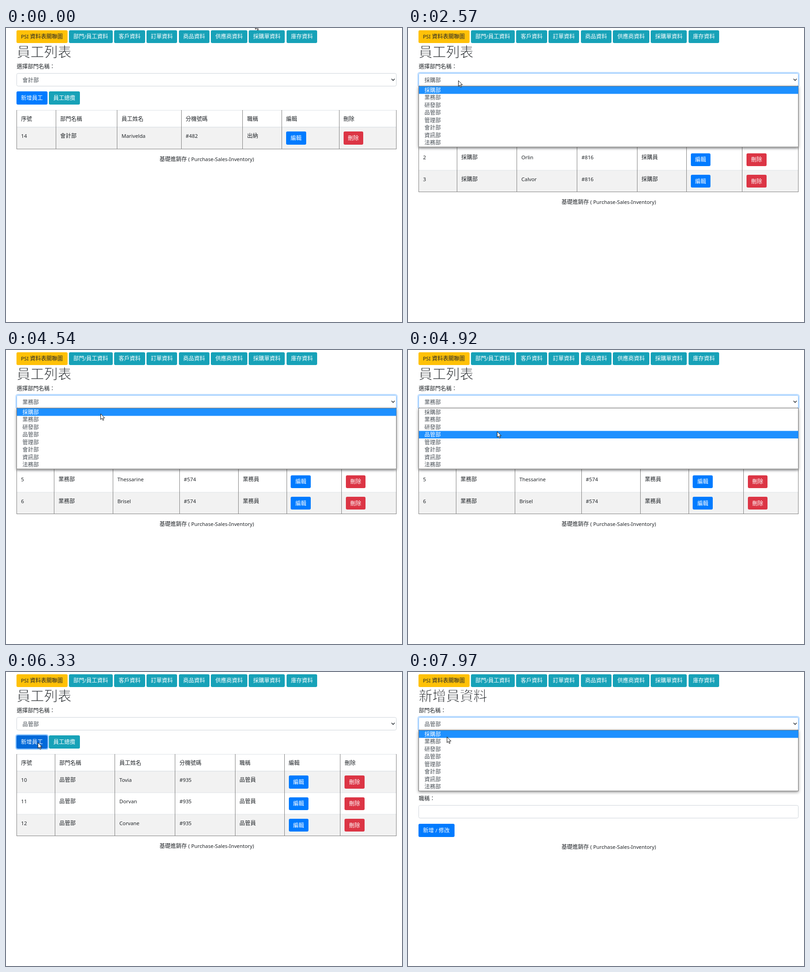
Write an HTML page that moves like this. It is 868x645 px and loops after 8000 ms.

```html
<!DOCTYPE html>
<html lang="zh-TW">
<head>
<meta charset="utf-8">
<style>
html, body { margin: 0; width: 100%; height: 100%; overflow: hidden; background: #fff; }
svg { display: block; width: 868px; height: 645px; font: 12px "Noto Sans", "Noto Sans CJK TC", "Noto Sans CJK", sans-serif; }
text { white-space: pre; }
.latin { font-size: .94em; }
.title { stroke: #fff; stroke-width: .9; }
.popup { filter: drop-shadow(0 2px 3px rgba(0, 0, 0, .45)); }
</style>
</head>
<body>
<svg viewBox="0 0 868 645">
  <g id="page"></g>
  <g id="pointer">
    <circle id="halo" r="9" fill="#ff0" fill-opacity=".5"/>
    <path d="M.5.5V13l2.9-2.7 2 4.6 2-.9-2-4.4h3.9z" fill="#fff" stroke="#111"/>
  </g>
</svg>
<script>
const LOOP = 8000, CLICK = 80;
const INK = '#212529', GRAY = '#495057', TEAL = '#17a2b8', BLUE = '#007bff', RED = '#dc3545';
const LEFT = 23.5, RIGHT = 855.5, PAD = 9.5, ROW = 47.3, ITEM = 16.5, MENU_TOP = 128;
const DEPTS = ['採購部', '業務部', '研發部', '品管部', '管理部', '會計部', '資訊部', '法務部'];
const NAV = ['PSI 資料表關聯圖', '部門/員工資料', '客戶資料', '訂單資料', '商品資料', '供應商資料', '採購單資料', '庫存資料'];
const HEADS = ['序號', '部門名稱', '員工姓名', '分機號碼', '職稱', '編輯', '刪除'];

// Each visit: when the page loads, when its menu is opened and when an entry is picked.
const VISITS = [
  { load: 0, open: 1090, pick: 1790, choice: 0, dept: 5,
    id: 14, ext: '#482', names: ['Marivelda'], jobs: ['出納'] },
  { load: 2095, open: 2490, pick: 3430, choice: 1, dept: 0,
    id: 1, ext: '#816', names: ['Palder', 'Orlin', 'Calvor'], jobs: ['採購員', '採購員', '採購部'] },
  { load: 3800, open: 4310, pick: 5150, choice: 3, dept: 1,
    id: 4, ext: '#574', names: ['Wenlor', 'Thessarine', 'Brisel'], jobs: ['業務員', '業務員', '業務員'] },
  { load: 5600, press: 6180, dept: 3,
    id: 10, ext: '#935', names: ['Tovia', 'Dorvan', 'Corvane'], jobs: ['品管員', '品管員', '品管員'] },
  { load: 6500, open: 7590, dept: 3, form: true }
];
// Pointer stops: arrival time, x, y.
const STOPS = [
  [0, 546, -10], [920, 78, 117], [1470, 70, 135], [2250, 110, 115], [3280, 143, 160.5],
  [4310, 206, 118], [4540, 207, 139.5], [4920, 195, 178.5], [5080, 194, 184],
  [6110, 69.5, 154.5], [6960, 75, 124], [7420, 79, 122], [7960, 85, 142]
];

function charWidth(ch) {
  if (ch > '~') return 12;
  return ch === ' ' ? 3.3 : /[a-z]/i.test(ch) ? 5.65 : 4.6;
}
const textWidth = str => [...str].reduce((sum, ch) => sum + charWidth(ch), 0);
const buttonWidth = label => textWidth(label) + 2 * PAD + .5;

function text(str, x, y, { color = INK, size = 12, weight = 400, anchor = 'start', cls = '' } = {}) {
  const runs = str.replace(/[!-~]+/g, run => `<tspan class="latin">${run}</tspan>`);
  return `<text class="${cls}" x="${x}" y="${y + size * .38}" fill="${color}" font-size="${size}" font-weight="${weight}" text-anchor="${anchor}">${runs}</text>`;
}
function rect(x, y, w, h, fill, extra = '') {
  return `<rect x="${x}" y="${y}" width="${w}" height="${h}" fill="${fill}" ${extra}/>`;
}
function line(x1, y1, x2, y2, color, width = 1) {
  return `<path d="M${x1} ${y1}L${x2} ${y2}" stroke="${color}" stroke-width="${width}"/>`;
}
function button(label, x, y, fill, color = '#fff') {
  const left = Math.round(x), top = Math.round(y);
  const w = Math.round(x + buttonWidth(label)) - left, h = Math.round(y + 28.5) - top;
  return rect(left, top, w, h, fill, 'rx="3"') + text(label, x + PAD + .25, y + 14.3, { color });
}
function ring(x, y, w, h, color) {
  return rect(x - 1.2, y - 1.2, w + 2.4, h + 2.4, 'none', `rx="4" stroke="${color}" stroke-width="2.4"`);
}
function field(y, stroke = '#ced4da') {
  return rect(LEFT, Math.round(y) + .5, RIGHT - LEFT, 28, '#fff', `rx="3" stroke="${stroke}"`);
}
function footer(y) {
  return text('基礎進銷存 ( Purchase-Sales-Inventory)', 440, y, { anchor: 'middle' });
}

function navBar() {
  let x = 22.9;
  return NAV.map((label, i) => {
    const item = button(label, x, 4.6, i ? TEAL : '#ffc107', i ? '#fff' : INK);
    x += buttonWidth(label) + 3.2;
    return item;
  }).join('');
}
function select(value, focused) {
  return (focused ? ring(23, 99, 833, 28.5, 'rgba(0,123,255,.25)') : '')
    + field(99, focused ? '#80bdff' : undefined)
    + text(DEPTS[value], 36, 114, { color: GRAY })
    + '<path d="M845 111.5l3.5 3.5 3.5-3.5" fill="none" stroke="#343a40" stroke-width="1.6"/>';
}
function menu(hovered) {
  const items = DEPTS.map((dept, i) => {
    const top = MENU_TOP + ITEM * i, on = i === hovered;
    return (on ? rect(24, top, RIGHT - 24, ITEM, '#1e90ff') : '')
      + text(dept, 36, top + 8.4, { color: on ? '#fff' : GRAY });
  }).join('');
  return `<g class="popup">${rect(LEFT, 127.5, RIGHT - LEFT, 133.5, '#fff', 'stroke="#777"')}</g>` + items;
}

// Columns share the table width in proportion to their widest content.
function columnEdges(rows) {
  const widths = HEADS.map((head, c) => 18 + (c < 5
    ? Math.max(...[head, ...rows.map(row => row[c])].map(textWidth))
    : buttonWidth(head)));
  const scale = (RIGHT - LEFT) / widths.reduce((a, b) => a + b);
  let x = LEFT;
  return [x, ...widths.map(w => x += w * scale)];
}
function table({ dept, id, ext, names, jobs }) {
  const rows = names.map((name, i) => [String(id + i), DEPTS[dept], name, ext, jobs[i]]);
  const edges = columnEdges(rows), cell = c => edges[c] + PAD;
  const bottom = Math.round(217.5 + ROW * rows.length) + .5;
  let out = HEADS.map((head, c) => text(head, cell(c), 199, { weight: 500 })).join('');
  rows.forEach((row, i) => {
    const y = 217.5 + ROW * i;
    if (i % 2 === 0) out += rect(LEFT, y, RIGHT - LEFT, ROW, '#f2f2f2');
    out += line(LEFT, y, RIGHT, y, '#dee2e6', i ? 1 : 1.5);
    row.forEach((value, c) => out += text(value, cell(c), y + 19));
    out += button('編輯', cell(5), y + 9.7, BLUE) + button('刪除', cell(6), y + 9.7, RED);
  });
  out += line(LEFT, 180.5, RIGHT, 180.5, '#dee2e6');
  edges.forEach(x => out += line(Math.floor(x + .01) + .5, 180, Math.floor(x + .01) + .5, bottom, '#808080'));
  return out + line(23, bottom, 856, bottom, '#808080') + footer(bottom + 22);
}

function listBody(visit, pressed, hot) {
  return (pressed ? ring(23, 139, 68, 29, 'rgba(38,143,255,.5)') : '')
    + button('新增員工', 23, 139.3, hot ? '#0069d9' : BLUE)
    + button('員工總攬', 94, 139.3, TEAL)
    + table(visit);
}
function formBody() {
  return ['員工姓名：', '分機號碼：', '職稱：'].map((label, i) =>
    text(label, 23.5, 148.5 + 64.5 * i) + field(163 + 64.5 * i)).join('')
    + button('新增 / 修改', 23, 333, BLUE) + footer(383);
}

function render(t, x, y) {
  const visit = VISITS.findLast(v => v.load <= t);
  const picked = t >= visit.pick + CLICK;
  const open = t >= visit.open + CLICK && !picked;
  const value = picked ? visit.choice : visit.dept;
  const hot = !open && x < 91 && y > 139 && y < 168;
  const hovered = y > MENU_TOP ? Math.floor((y - MENU_TOP) / ITEM) : value;
  return navBar()
    + text(visit.form ? '新增員資料' : '員工列表', 23.5, 52, { size: 30, weight: 300, cls: 'title' })
    + text(visit.form ? '部門名稱：' : '選擇部門名稱：', 23.5, 84)
    + select(value, t >= visit.open)
    + (visit.form ? formBody() : listBody(visit, t >= visit.press, hot))
    + (open ? menu(hovered) : '');
}

// Longer trips take longer, and each ends at its stop's arrival time.
function pointerAt(t) {
  const next = STOPS.findIndex(stop => stop[0] > t);
  if (next < 0) return STOPS.at(-1).slice(1);
  const [t0, x0, y0] = STOPS[next - 1], [t1, x1, y1] = STOPS[next];
  const trip = Math.min(t1 - t0, 28 * Math.sqrt(Math.hypot(x1 - x0, y1 - y0)));
  const k = Math.max(0, 1 - (t1 - t) / trip), ease = k * k * (3 - 2 * k);
  return [x0 + (x1 - x0) * ease, y0 + (y1 - y0) * ease];
}

const pageNode = document.getElementById('page');
const pointer = document.getElementById('pointer');
const halo = document.getElementById('halo');
const clicks = VISITS.flatMap(({ open, pick, press }) => [open, pick, press]);
let shown = '';

function draw(now) {
  const t = now % LOOP;
  const [x, y] = pointerAt(t);
  const markup = render(t, x, y);
  if (markup !== shown) pageNode.innerHTML = shown = markup;
  pointer.setAttribute('transform', `translate(${x} ${y})`);
  halo.style.display = clicks.some(start => t >= start && t < start + CLICK) ? '' : 'none';
  requestAnimationFrame(draw);
}
draw(0);
</script>
</body>
</html>
```
